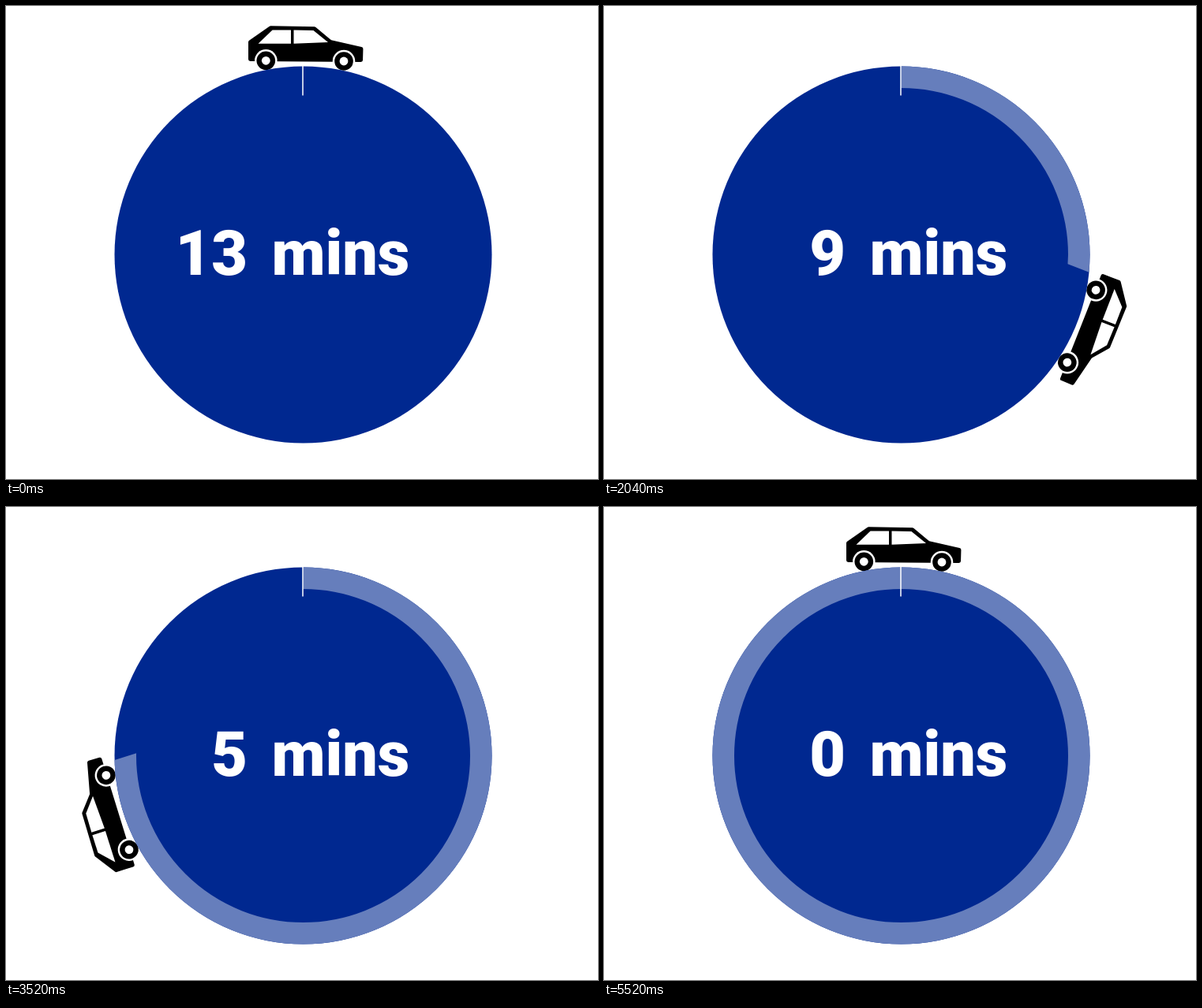
An HTML page with a canvas for the animation above (7 s loop, 750 by 600 pixels).

```html
<!DOCTYPE html>
<html lang="en">
<head>
<meta charset="utf-8">
<title>Countdown drive</title>
<style>
  html, body { margin: 0; width: 100%; height: 100%; overflow: hidden; background: #fff; }
  canvas { display: block; }
</style>
</head>
<body>
<canvas id="stage" width="750" height="600"></canvas>
<script>
const ctx = document.getElementById('stage').getContext('2d');
const LOOP = 7000, DRIVE = 5520, STEP = 40;
const CX = 376.5, CY = 315.5, R = 239, INNER = 211.5;
const WIPE_Y = 245.6; // the trail is wiped around a point above the centre
const BLUE = '#002890', TRAIL = '#667ebc';

const BODY = [[307, 44.5], [334.5, 25.3], [391.5, 26.3], [411.5, 43], [452.5, 52.5], [452, 71], [307, 70]];
const REAR_WINDOW = [[319.5, 47.8], [337.5, 30.5], [361, 30.5], [361, 47.8]];
const FRONT_WINDOW = [[364.5, 30.5], [389.5, 31], [408, 46], [364.5, 47.8]];
const WHEELS = [[329.3, 69.3], [428, 70]];

function polygon(points, color) {
  ctx.beginPath();
  points.forEach(([x, y]) => ctx.lineTo(x, y));
  ctx.closePath();
  ctx.fillStyle = color;
  ctx.fill();
}

function roundedPolygon(points, radius, color) {
  const n = points.length;
  const [ax, ay] = points[n - 1], [bx, by] = points[0];
  ctx.beginPath();
  ctx.moveTo((ax + bx) / 2, (ay + by) / 2);
  points.forEach(([x, y], i) => ctx.arcTo(x, y, ...points[(i + 1) % n], radius));
  ctx.closePath();
  ctx.fillStyle = color;
  ctx.fill();
}

function disc(x, y, r, color) {
  ctx.beginPath();
  ctx.arc(x, y, r, 0, 2 * Math.PI);
  ctx.fillStyle = color;
  ctx.fill();
}

function drawCar(angle) {
  ctx.save();
  ctx.translate(CX, CY);
  ctx.rotate(angle);
  ctx.translate(-CX, -CY);
  roundedPolygon(BODY, 2.5, '#000');
  polygon(REAR_WINDOW, '#fff');
  polygon(FRONT_WINDOW, '#fff');
  for (const [x, y] of WHEELS) {
    disc(x, y, 14.3, '#fff');
    disc(x, y, 11.8, '#000');
    disc(x, y, 5.4, '#fff');
  }
  ctx.restore();
}

function drawTrail(angle) {
  if (angle <= 0) return;
  ctx.save();
  ctx.beginPath();
  ctx.moveTo(CX, WIPE_Y);
  ctx.arc(CX, WIPE_Y, 600, -Math.PI / 2, angle - Math.PI / 2);
  ctx.closePath();
  ctx.clip();
  ctx.beginPath();
  ctx.arc(CX, CY, (R + INNER) / 2, 0, 2 * Math.PI);
  ctx.lineWidth = R - INNER;
  ctx.strokeStyle = TRAIL;
  ctx.stroke();
  ctx.restore();
}

function drawLabel(minutes) {
  ctx.font = '900 79px Roboto, Lato, sans-serif';
  ctx.fillStyle = '#fff';
  ctx.textAlign = 'right';
  ctx.fillText(minutes, 306, 340.5);
  ctx.textAlign = 'left';
  ctx.fillText('mins', 336.5, 340.5);
}

function minutesAt(t) {
  const ticks = Math.floor((t - 340) / 380);
  return 13 - Math.min(13, Math.max(0, ticks));
}

function draw(t) {
  const p = Math.min(t / DRIVE, 1);
  const angle = 2 * Math.PI * p * p * (3 - 2 * p);
  ctx.fillStyle = '#fff';
  ctx.fillRect(0, 0, 750, 600);
  drawCar(angle);
  disc(CX, CY, R, BLUE);
  drawTrail(angle);
  ctx.fillStyle = '#fff';
  ctx.fillRect(375.25, 76, 1.5, 37.5);
  drawLabel(minutesAt(t));
}

const start = performance.now();
function tick() {
  const t = (performance.now() - start) % LOOP;
  draw(Math.floor(t / STEP) * STEP);
  requestAnimationFrame(tick);
}
tick();
</script>
</body>
</html>
```
